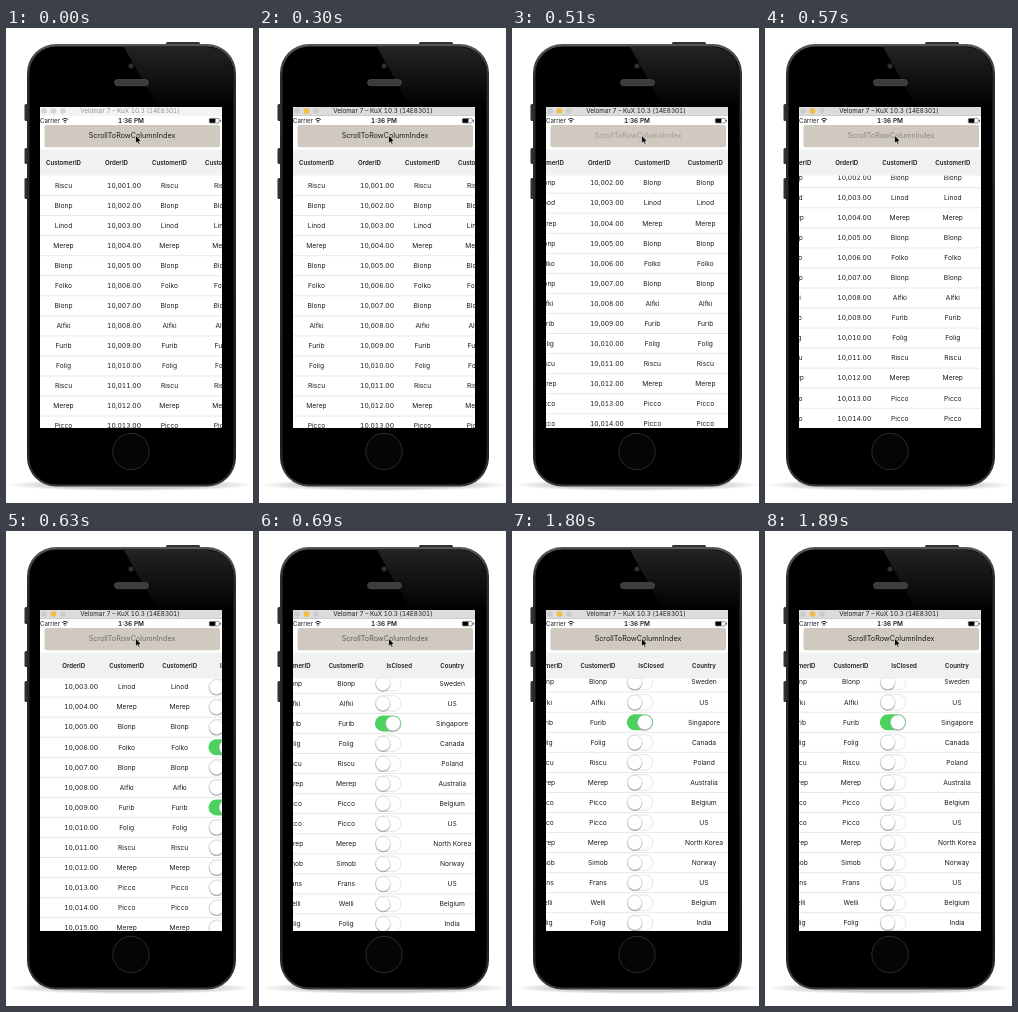
An HTML page that plays this animation: 247x475 px, repeating every 2010 ms.

```html
<!DOCTYPE html>
<html lang="en">
<head>
<meta charset="utf-8">
<title>Scroll to row and column</title>
<style>
  /* A custom property keeps the scrolled text off a compositor layer, so it stays sharp. */
  @property --scroll { syntax: "<number>"; inherits: true; initial-value: 0; }
  @property --ink { syntax: "<number>"; inherits: true; initial-value: 1; }

  html, body { margin: 0; width: 100%; height: 100%; overflow: hidden; background: #fff; }
  svg { display: block; width: 100%; height: 100%; animation: 2010ms step-end infinite; animation-name: scroll, press; }
  text { font: 6.7px Inter, "Liberation Sans", sans-serif; fill: #1c1c1c; text-anchor: middle; font-variant-numeric: tabular-nums; }
  .head text { font-size: 6.1px; font-weight: 600; }
  .title text { font-size: 6.3px; }
  .number { text-anchor: end; }
  .rule { stroke: #dedede; stroke-width: .7; }
  .scroll-x { transform: translateX(calc(var(--scroll) * -130.5px)); }
  .scroll-y { transform: translateY(calc(var(--scroll) * -126.6px)); }
  .press { font-size: 7.2px; fill-opacity: var(--ink); }
  .active { animation: activate 2010ms step-end infinite; }

  @keyframes activate {
    0% { visibility: hidden; }
    14.92%, 100% { visibility: visible; }
  }
  @keyframes press {
    0% { --ink: 1; }
    20.89% { --ink: .2; }
    25.37% { --ink: .25; }
    28.35% { --ink: .38; }
    31.34% { --ink: .52; }
    34.32% { --ink: .62; }
    35.82% { --ink: .75; }
    40.29%, 100% { --ink: 1; }
  }
  @keyframes scroll {
    0% { --scroll: 0; }
    23.88% { --scroll: .07; }
    25.37% { --scroll: .177; }
    28.35% { --scroll: .22; }
    29.85% { --scroll: .27; }
    31.34% { --scroll: .328; }
    32.83% { --scroll: .81; }
    34.32% { --scroll: .991; }
    35.82%, 100% { --scroll: 1; }
  }
</style>
</head>
<body>
<svg viewBox="0 0 247 475">
  <defs>
    <clipPath id="screen"><rect x="34" y="79" width="182" height="321"/></clipPath>
    <clipPath id="body"><rect x="33" y="147.5" width="184" height="253"/></clipPath>
    <linearGradient id="metal" x1="0" x2="0" y1="0" y2="1">
      <stop offset="0" stop-color="#55575a"/>
      <stop offset=".08" stop-color="#2b2c2e"/>
      <stop offset=".9" stop-color="#1d1e1f"/>
      <stop offset="1" stop-color="#3a3b3d"/>
    </linearGradient>
    <linearGradient id="glare" x1="0" x2="0" y1="0" y2="1">
      <stop offset="0" stop-color="#222325"/>
      <stop offset="1" stop-color="#000"/>
    </linearGradient>
    <radialGradient id="shadow">
      <stop offset=".6" stop-color="#777" stop-opacity=".4"/>
      <stop offset="1" stop-color="#777" stop-opacity="0"/>
    </radialGradient>
    <g id="knob">
      <circle cy=".9" r="7.5" fill="#a8a8a8"/>
      <circle r="7.3" fill="#fff" stroke="#c4c4c4" stroke-width=".5"/>
    </g>
    <g id="off">
      <rect x="-12.9" y="-7.7" width="25.8" height="15.4" rx="7.7" fill="#fff" stroke="#e2e2e2" stroke-width=".9"/>
      <use href="#knob" x="-5.2"/>
    </g>
    <g id="on">
      <rect x="-13.2" y="-8" width="26.4" height="16" rx="8" fill="#4cd15f"/>
      <use href="#knob" x="4.9"/>
    </g>
    <g id="dots">
      <circle cx="38" cy="83" r="2.8"/><circle cx="47.5" cy="83" r="2.8"/><circle cx="57" cy="83" r="2.8"/>
    </g>
  </defs>

  <!-- Phone -->
  <ellipse cx="125" cy="457" rx="124" ry="6" fill="url(#shadow)"/>
  <g fill="#303133">
    <rect x="160" y="14" width="34" height="4" rx="1.5"/>
    <rect x="18.5" y="76" width="4" height="17" rx="1.5"/>
    <rect x="18.5" y="120" width="4" height="16" rx="1.5"/>
    <rect x="18.5" y="150" width="4" height="21" rx="1.5"/>
  </g>
  <rect x="21" y="16" width="209" height="442.5" rx="29" fill="url(#metal)"/>
  <rect x="23.5" y="18.5" width="204" height="438" rx="26.5" fill="#000"/>
  <path d="M118 19h83q25 2 26 27v34h-75z" fill="url(#glare)"/>
  <circle cx="125" cy="38" r="2.6" fill="#30343d" stroke="#111" stroke-width=".8"/>
  <rect x="108.5" y="51.5" width="34" height="6.2" rx="3.1" fill="#3c3c3e" stroke="#58585b" stroke-width=".6"/>
  <circle cx="125" cy="423.5" r="18.2" fill="#050505" stroke="#2c2c2e"/>

  <g clip-path="url(#screen)">
    <rect x="33" y="79" width="184" height="322" fill="#fff"/>

    <g clip-path="url(#body)">
      <g class="scroll-y"><g id="lines"/><g class="scroll-x" id="cells"/></g>
    </g>
    <rect x="33" y="121.5" width="184" height="26" fill="#f1f1f1"/>
    <g class="head"><g class="scroll-x" id="heads"/></g>

    <!-- Window title -->
    <g class="title">
      <rect x="33" y="79" width="184" height="9" fill="#f4f4f4"/>
      <use href="#dots" fill="#d4d4d4"/>
      <text x="124" y="85.4" fill-opacity=".45">Velomar 7 – KuX 10.3 (14E8301)</text>
      <g class="active">
        <rect x="33" y="79" width="184" height="9" fill="#dcdcdc"/>
        <rect x="33" y="87.4" width="184" height=".6" fill="#c2c2c2"/>
        <use href="#dots" fill="#cbcbcb"/>
        <circle cx="47.5" cy="83" r="2.8" fill="#f3bd42"/>
        <text x="124" y="85.4">Velomar 7 – KuX 10.3 (14E8301)</text>
      </g>
    </g>

    <!-- Status bar -->
    <text x="34" y="94.8" style="font-size:6.1px;text-anchor:start">Carrier</text>
    <path d="M56.2 91.5q2.8-2.4 5.6 0M57.4 93q1.6-1.3 3.2 0" fill="none" stroke="#222"/>
    <circle cx="59" cy="94.3" r=".7" fill="#222"/>
    <text x="125" y="95" style="font-size:6.4px;font-weight:600">1:36 PM</text>
    <rect x="203.3" y="90.4" width="10" height="4.6" rx="1" fill="#fff" stroke="#333" stroke-width=".5"/>
    <rect x="203.6" y="90.7" width="5.8" height="4" rx=".6" fill="#000"/>
    <rect x="213.9" y="91.8" width=".9" height="1.8" fill="#333"/>

    <!-- Button -->
    <rect x="38.5" y="97" width="175.5" height="22.3" rx="2" fill="#cfc9bf"/>
    <text class="press" x="126" y="110">ScrollToRowColumnIndex</text>
  </g>

  <path d="M129.6 107.3v8.2l1.9-1.7 1.2 2.8 1.4-.6-1.2-2.7h2.5z" fill="#000" stroke="#fff" stroke-width=".6"/>
</svg>

<script>
  const customers = ("Riscu Blonp Linod Merep Blonp Folko Blonp Alfki Furib Folig Riscu " +
    "Merep Picco Picco Merep Simob Frans Welli Folig Merep").split(" ");
  const countries = ("Norway,US,India,Canada,Poland,Belgium,Sweden,US,Singapore,Canada,Poland," +
    "Australia,Belgium,US,North Korea,Norway,US,Belgium,India,Sweden").split(",");
  const closed = [6, 9];
  const titles = ["CustomerID", "OrderID", "CustomerID", "CustomerID", "IsClosed", "Country"];
  const ROW = 20.05, COLUMN = 53;
  const columnX = i => 57.5 + COLUMN * i;

  function add(parent, tag, attributes, content = "") {
    const node = document.createElementNS("http://www.w3.org/2000/svg", tag);
    for (const key in attributes) node.setAttribute(key, attributes[key]);
    node.textContent = content;
    document.getElementById(parent).append(node);
  }

  titles.forEach((title, i) => add("heads", "text", { x: columnX(i), y: 137.3 }, title));

  customers.forEach((customer, i) => {
    const middle = 157.5 + ROW * i, y = middle + 2.3, line = middle + ROW / 2;
    add("lines", "line", { class: "rule", x1: 33, x2: 217, y1: line, y2: line });
    for (const column of [0, 2, 3]) add("cells", "text", { x: columnX(column), y }, customer);
    add("cells", "text", { class: "number", x: 135, y }, `10,0${String(i + 1).padStart(2, "0")}.00`);
    add("cells", "use", {
      href: closed.includes(i + 1) ? "#on" : "#off",
      transform: `translate(258.5 ${middle})`
    });
    add("cells", "text", { x: columnX(5), y }, countries[i]);
  });
</script>
</body>
</html>
```
